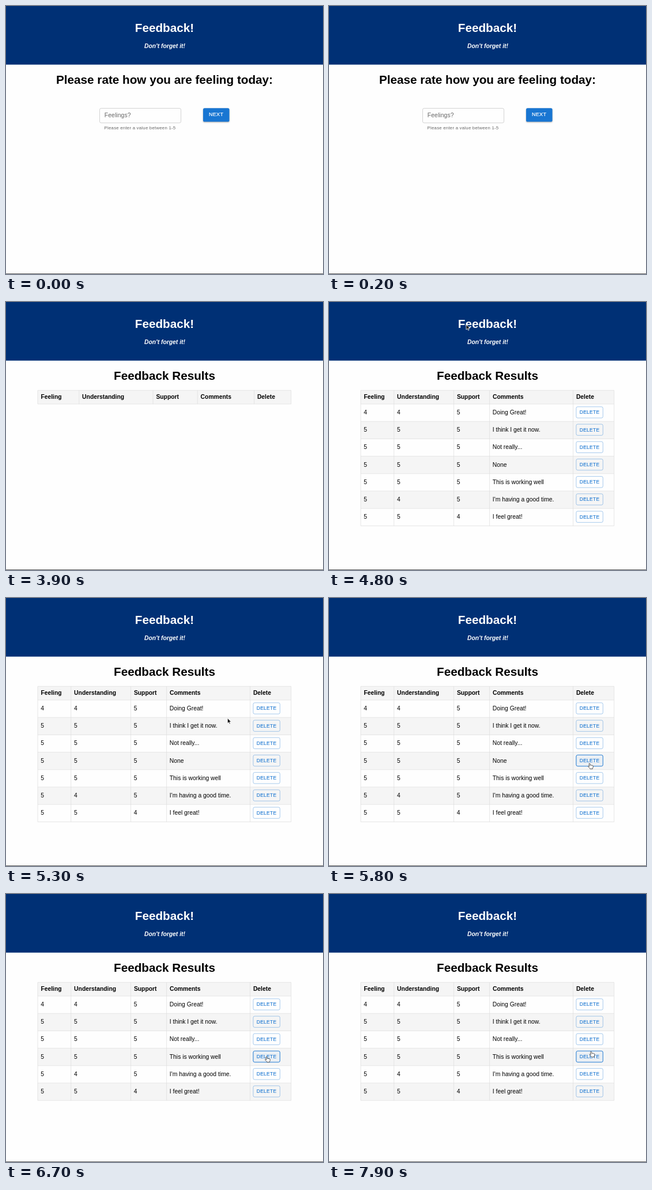
Recreate the animation shown at these times as an HTML page. Size 550 by 465 pixels, loop 8000 ms.

```html
<!DOCTYPE html>
<html lang="en">
<head>
<meta charset="utf-8">
<title>Feedback</title>
<style>
  html, body { margin: 0; width: 100%; height: 100%; overflow: hidden; background: #fefefe; }
  svg { display: block; width: 100vw; height: 100vh; font: 10.35px "Liberation Sans", Arial, sans-serif; }
  text { white-space: pre; }
  .title { font-size: 20.7px; font-weight: 700; text-anchor: middle; }
  .tagline { font-weight: 700; font-style: italic; text-anchor: middle; }
  .head { font-weight: 700; }
  .label { fill: #666; letter-spacing: .097px; }
  .helper { font-size: 7.76px; fill: #666; letter-spacing: .26px; }
  .next { font-size: 9.06px; font-weight: 500; fill: #fff; stroke: #fff; stroke-width: .2; letter-spacing: .27px; }
  .delete { font-size: 8.41px; font-weight: 500; fill: #1976d2; stroke: #1976d2; stroke-width: .12; letter-spacing: .3px; }
  .grid { fill: none; stroke: #ddd; stroke-width: .7; }
  .cursor { stroke-width: .8; stroke-linejoin: round; }
</style>
</head>
<body>
<svg id="stage" viewBox="0 0 550 465" preserveAspectRatio="none"></svg>
<script>
const LOOP = 8000;
const STEP = 100;
const SHOW_EMPTY = 3900, SHOW_FULL = 4000, POINTER_IN = 4800;
const HOVER = 5500, PRESS = 6300, REMOVED = 6400;
const TOP = 153.3, HEAD_BOTTOM = 177, ROW = 30.2;
const TARGET_ROW = 3;

const stage = document.getElementById('stage');

function add(parent, tag, attrs = {}, content) {
  const node = document.createElementNS('http://www.w3.org/2000/svg', tag);
  for (const key in attrs) node.setAttribute(key, attrs[key]);
  if (content !== undefined) node.textContent = content;
  return parent.appendChild(node);
}
const rect = (parent, x, y, width, height, attrs) =>
  add(parent, 'rect', { x, y, width, height, ...attrs });
const text = (parent, x, y, content, cls = '') =>
  add(parent, 'text', { x, y, class: cls }, content);

function drawHeader() {
  rect(stage, 0, 0, 550, 465, { fill: '#fefefe' });
  rect(stage, 0, 0, 550, 101.7, { fill: '#003075' });
  const group = add(stage, 'g', { fill: '#fff' });
  text(group, 275, 45.2, 'Feedback!', 'title');
  text(group, 275.5, 73, "Don't forget it!", 'tagline');
  rect(stage, 0, 464, 550, 1, { fill: '#626262' });
}

function drawForm() {
  const page = add(stage, 'g');
  text(page, 275, 135, 'Please rate how you are feeling today:', 'title');
  rect(page, 162.5, 177.5, 141, 25.3, { rx: 2.6, fill: 'none', stroke: '#c4c4c4', 'stroke-width': .75 });
  text(page, 170.8, 193, 'Feelings?', 'label');
  text(page, 170.6, 214, 'Please enter a value between 1-5', 'helper');
  rect(page, 342, 177.2, 45.5, 23.6, {
    rx: 2.6, fill: '#1976d2',
    style: 'filter: drop-shadow(0 1px 1px rgba(0,0,0,.35))'
  });
  text(page, 352, 191.3, 'NEXT', 'next');
  return page;
}

const buttonBox = (parent, x, row, attrs) =>
  rect(parent, x, HEAD_BOTTOM + row * ROW + 4.8, 46.4, 19.4, { rx: 2.6, 'stroke-width': .75, ...attrs });

function drawTable(cols, rows) {
  const page = add(stage, 'g');
  const [left, right] = [cols[0], cols[cols.length - 1]];
  const bottom = HEAD_BOTTOM + rows.length * ROW;
  text(page, 275, 135, 'Feedback Results', 'title');
  rect(page, left, TOP, right - left, HEAD_BOTTOM - TOP, { fill: '#f5f5f5' });
  rows.forEach((_, i) => {
    if (i % 2) rect(page, left, HEAD_BOTTOM + i * ROW, right - left, ROW, { fill: '#f5f5f5' });
  });

  let lines = cols.map(x => `M${x} ${TOP}V${bottom}`).join('') + `M${left} ${TOP}H${right}`;
  for (let i = 0; i <= rows.length; i++) lines += `M${left} ${HEAD_BOTTOM + i * ROW}H${right}`;
  add(page, 'path', { d: lines, class: 'grid' });

  ['Feeling', 'Understanding', 'Support', 'Comments', 'Delete']
    .forEach((name, i) => text(page, cols[i] + 5.4, 168.3, name, 'head'));

  rows.forEach((cells, i) => {
    const y = HEAD_BOTTOM + i * ROW;
    cells.forEach((cell, j) => text(page, cols[j] + 5.2, y + 18, cell));
    buttonBox(page, cols[4] + 5.4, i, { fill: 'none', stroke: '#1976d2', 'stroke-opacity': .5 });
    text(page, cols[4] + 11.3, y + 17.4, 'DELETE', 'delete');
  });
  return page;
}

const entries = [
  [4, 4, 5, 'Doing Great!'],
  [5, 5, 5, 'I think I get it now.'],
  [5, 5, 5, 'Not really...'],
  [5, 5, 5, 'None'],
  [5, 5, 5, 'This is working well'],
  [5, 4, 5, "I'm having a good time."],
  [5, 5, 4, 'I feel great!']
];
const wideCols = [55, 112.7, 216.5, 278.6, 423.5, 494.6];

drawHeader();
const pages = {
  form: drawForm(),
  empty: drawTable([55, 126.7, 255, 332.2, 430.5, 494.6], []),
  full: drawTable(wideCols, entries),
  reduced: drawTable(wideCols, entries.filter((_, i) => i !== TARGET_ROW))
};
const hover = buttonBox(stage, wideCols[4] + 5.4, TARGET_ROW,
  { fill: '#1976d2', 'fill-opacity': .05, stroke: '#1976d2' });
const press = buttonBox(stage, wideCols[4] + 5.4, TARGET_ROW, { fill: '#1976d2', opacity: .15 });

// Both pointers have their tip at 0,0.
const arrow = add(stage, 'path', {
  d: 'M0 0V9L2.1 7.1L3.5 10.2L5 9.5L3.6 6.5H6.4Z',
  class: 'cursor', fill: '#111', stroke: '#fff'
});
const hand = add(stage, 'path', {
  d: 'M-.9 .8Q-.8 -.2 0 0Q.8 .1 1 1L1.7 3.5Q2.5 2.6 3.3 3.4Q4.2 2.8 4.8 3.7Q6.2 3.4 6.3 5' +
     'Q6.5 7 5.4 8.2V9.5H.9Q.4 8.2 -.8 7.2L-2.4 5.5Q-2.6 4.2 -1.2 4.6L-.2 5.3Z',
  class: 'cursor', fill: '#fff', stroke: '#333'
});

const path = [
  [4800, 238, 39],
  [5600, 452, 287],
  [6300, 452, 287],
  [6700, 452, 282.3],
  [7500, 452, 282.3],
  [7900, 454.6, 273.3]
];
const clamp = v => Math.min(1, Math.max(0, v));
const ease = v => v * v * (3 - 2 * v);

function pointerAt(t) {
  let i = 0;
  while (i < path.length - 2 && t >= path[i + 1][0]) i++;
  const [t0, x0, y0] = path[i], [t1, x1, y1] = path[i + 1];
  const k = ease(clamp((t - t0) / (t1 - t0)));
  return [x0 + (x1 - x0) * k, y0 + (y1 - y0) * k];
}

const show = (node, on) => node.setAttribute('visibility', on ? 'visible' : 'hidden');

function render(time) {
  const t = Math.floor(time % LOOP / STEP) * STEP;
  const current = t < SHOW_EMPTY ? 'form' : t < SHOW_FULL ? 'empty' : t < REMOVED ? 'full' : 'reduced';
  for (const name in pages) show(pages[name], name === current);

  hover.setAttribute('opacity', clamp((t - HOVER) / 250));
  show(press, t >= PRESS && t < REMOVED);

  const [x, y] = pointerAt(t);
  for (const node of [arrow, hand]) node.setAttribute('transform', `translate(${x} ${y})`);
  show(arrow, t >= POINTER_IN && t < HOVER);
  show(hand, t >= HOVER);
}

const start = performance.now();
function tick() {
  render(performance.now() - start);
  requestAnimationFrame(tick);
}
tick();
</script>
</body>
</html>
```
